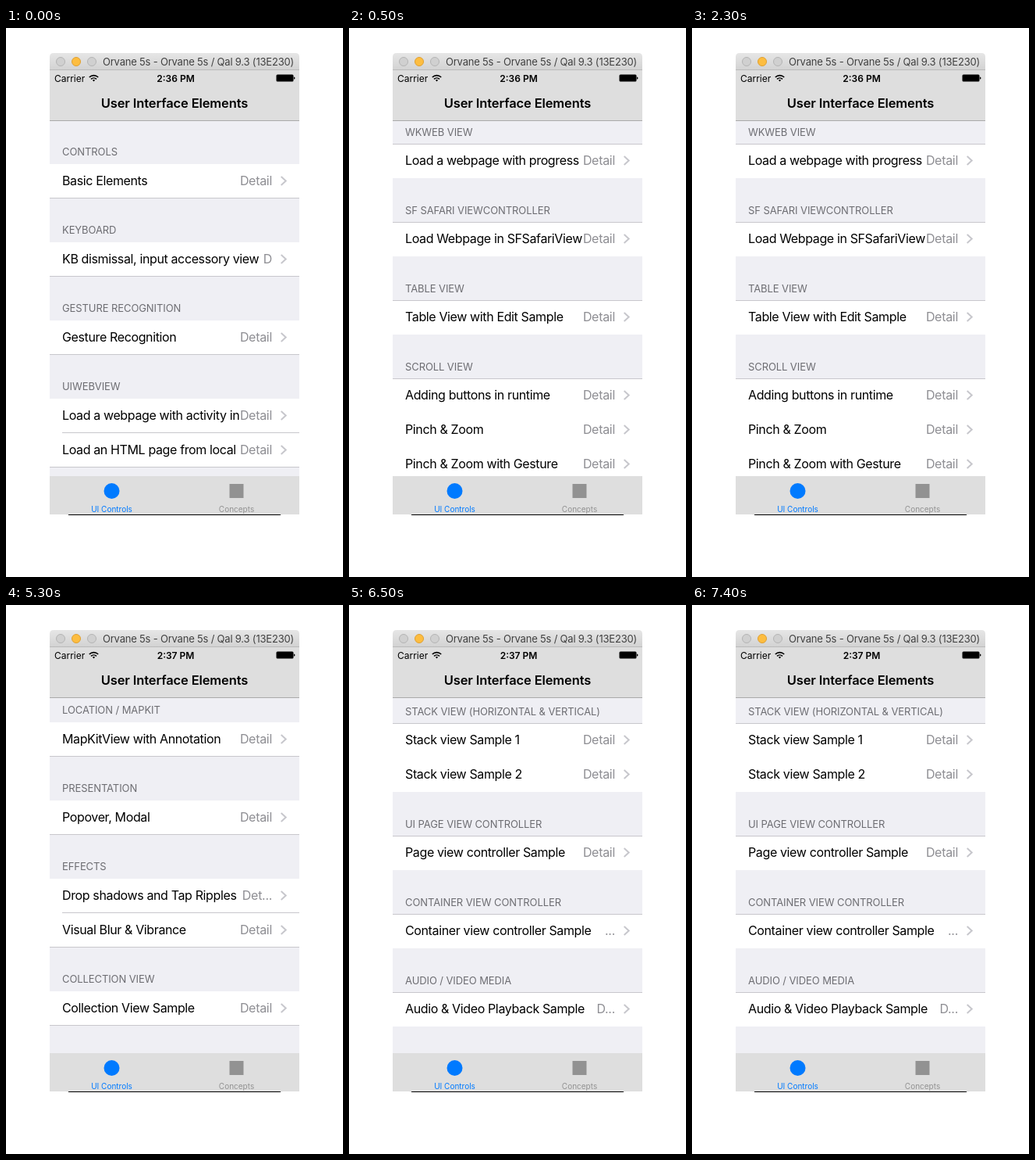
An HTML page that plays this animation: 432x702 px, repeating every 8000 ms.

```html
<!DOCTYPE html>
<html lang="en">
<head>
<meta charset="utf-8">
<title>User Interface Elements</title>
<style>
  html, body { margin: 0; width: 100%; height: 100%; overflow: hidden; background: #fff; }
  svg { display: block; width: 432px; height: 702px; font-family: Inter, sans-serif; }
  text { white-space: pre; }
  .mid { text-anchor: middle; }
  .header { font-size: 13px; letter-spacing: -.09px; fill: #6d6d72; }
  .row, .detail { font-size: 16px; letter-spacing: -.37px; }
  .detail { letter-spacing: -.3px; fill: #8e8e93; text-anchor: end; }
  .chevron { fill: none; stroke: #c7c7cc; stroke-width: 2; }
  .tab { font-size: 10px; text-anchor: middle; }
</style>
</head>
<body>
<svg viewBox="0 0 432 702">
  <defs>
    <linearGradient id="bar" x2="0" y2="1">
      <stop stop-color="#e6e6e6"/><stop offset="1" stop-color="#d2d2d2"/>
    </linearGradient>
    <clipPath id="list"><path d="M56 119h320v454H56z"/></clipPath>
    <clipPath id="label"><path d="M56 119h243v454H56z"/></clipPath>
  </defs>

  <path d="M56 54V37q0-5 5-5h310q5 0 5 5v17z" fill="url(#bar)"/>
  <path d="M56 53h320v1H56z" fill="#bababa"/>
  <g stroke-width="1">
    <circle cx="70" cy="43" r="5.5" fill="#d0d0d0" stroke="#b4b4b4"/>
    <circle cx="90" cy="43" r="5.5" fill="#fdbd40" stroke="#dfa032"/>
    <circle cx="110" cy="43" r="5.5" fill="#d0d0d0" stroke="#b4b4b4"/>
  </g>
  <text class="mid" x="246.5" y="48" font-size="13" letter-spacing="-.2" fill="#404040">Orvane 5s - Orvane 5s / Qal 9.3 (13E230)</text>

  <path d="M56 54h320v64H56z" fill="#dedede"/>
  <path d="M56 118h320v1H56z" fill="#aaa"/>
  <text x="62" y="68.5" font-size="12">Carrier</text>
  <g fill="none" stroke="#000" stroke-width="1.6">
    <path d="M106.8 63a8 8 0 0 1 11.4 0M109 65.4a5 5 0 0 1 7 0"/>
    <path d="M110.8 66.6q1.7-1.3 3.4 0l-1.7 1.9z" fill="#000" stroke="none"/>
  </g>
  <text id="clock" class="mid" x="217.5" y="68.5" font-size="12" font-weight="600"></text>
  <rect x="346.5" y="59.5" width="22" height="9" rx="1.5"/>
  <path d="M369 62.5q1.5 0 1.5 1.5t-1.5 1.5z"/>
  <text class="mid" x="216" y="102" font-size="16.5" font-weight="600" letter-spacing="-.12">User Interface Elements</text>

  <path d="M56 119h320v454H56z" fill="#efeff4"/>
  <g id="table" clip-path="url(#list)"></g>

  <path d="M56 573h320v49H56z" fill="#dedede"/>
  <circle cx="135.5" cy="592" r="10" fill="#007aff"/>
  <path d="M286.5 583h18v18h-18z" fill="#929292"/>
  <text class="tab" x="135.5" y="618.5" fill="#007aff">UI Controls</text>
  <text class="tab" x="295.5" y="618.5" fill="#929292">Concepts</text>
  <path d="M80 622h272v1H80z"/>
</svg>
<script>
  // A row may carry its own shortened detail after "|".
  const pages = [
    { start: 0, clock: '2:36 PM', top: 174, ruleBelow: true, sections: [
      ['CONTROLS', 'Basic Elements'],
      ['KEYBOARD', 'KB dismissal, input accessory view|D'],
      ['GESTURE RECOGNITION', 'Gesture Recognition'],
      ['UIWEBVIEW', 'Load a webpage with activity indicator', 'Load an HTML page from local'],
    ] },
    { start: 500, clock: '2:36 PM', top: 149, ruleBelow: false, sections: [
      ['WKWEB VIEW', 'Load a webpage with progress indicator'],
      ['SF SAFARI VIEWCONTROLLER', 'Load Webpage in SFSafariViewController'],
      ['TABLE VIEW', 'Table View with Edit Sample'],
      ['SCROLL VIEW', 'Adding buttons in runtime', 'Pinch & Zoom', 'Pinch & Zoom with Gesture'],
    ] },
    { start: 3500, clock: '2:37 PM', top: 150, ruleBelow: true, sections: [
      ['LOCATION / MAPKIT', 'MapKitView with Annotation'],
      ['PRESENTATION', 'Popover, Modal'],
      ['EFFECTS', 'Drop shadows and Tap Ripples|Det...', 'Visual Blur & Vibrance'],
      ['COLLECTION VIEW', 'Collection View Sample'],
    ] },
    { start: 6500, clock: '2:37 PM', top: 152, ruleBelow: false, sections: [
      ['STACK VIEW (HORIZONTAL & VERTICAL)', 'Stack view Sample 1', 'Stack view Sample 2'],
      ['UI PAGE VIEW CONTROLLER', 'Page view controller Sample'],
      ['CONTAINER VIEW CONTROLLER', 'Container view controller Sample|...'],
      ['AUDIO / VIDEO MEDIA', 'Audio & Video Playback Sample|D...'],
    ] },
  ];
  const LOOP = 8000, ROW = 44, GAP = 56;
  const table = document.getElementById('table');
  const clock = document.getElementById('clock');

  const box = (x, y, h, fill) =>
    `<rect x="${x}" y="${y}" width="${376 - x}" height="${h}" fill="${fill}"/>`;
  const text = (type, x, y, value, extra = '') =>
    `<text class="${type}" x="${x}" y="${y}" ${extra}>${value.replace('&', '&amp;')}</text>`;

  function drawRow(row, baseline) {
    const [label, detail] = row.split('|');
    const clip = detail ? '' : 'clip-path="url(#label)"';
    return text('row', 72, baseline, label, clip) +
      text('detail', 341, baseline, detail || 'Detail') +
      `<path class="chevron" d="M352.7 ${baseline - 11}l6 5.5-6 5.5"/>`;
  }

  function drawPage({ top, ruleBelow, sections }) {
    // Pages ruled above sit half a point off the grid, so their text rounds up a pixel.
    const textOffset = ruleBelow ? 27 : 26;
    let y = top, svg = '';
    for (const [header, ...rows] of sections) {
      const height = rows.length * ROW - 1;
      svg += text('header', 72, y - 11, header) + box(56, y, height, '#fff') +
        box(56, ruleBelow ? y + height : y - 1, 1, '#c8c7cc');
      rows.forEach((row, i) => {
        const rowY = y + i * ROW;
        if (i && ruleBelow) svg += box(72, rowY - 1, 1, '#c8c7cc');
        svg += drawRow(row, rowY + textOffset);
      });
      y += height + 1 + GAP;
    }
    return svg;
  }

  let current;
  function frame() {
    const time = performance.now() % LOOP;
    const page = pages.findLast(p => p.start <= time);
    if (page !== current) {
      current = page;
      clock.textContent = page.clock;
      table.innerHTML = drawPage(page);
    }
    requestAnimationFrame(frame);
  }
  frame();
</script>
</body>
</html>
```
